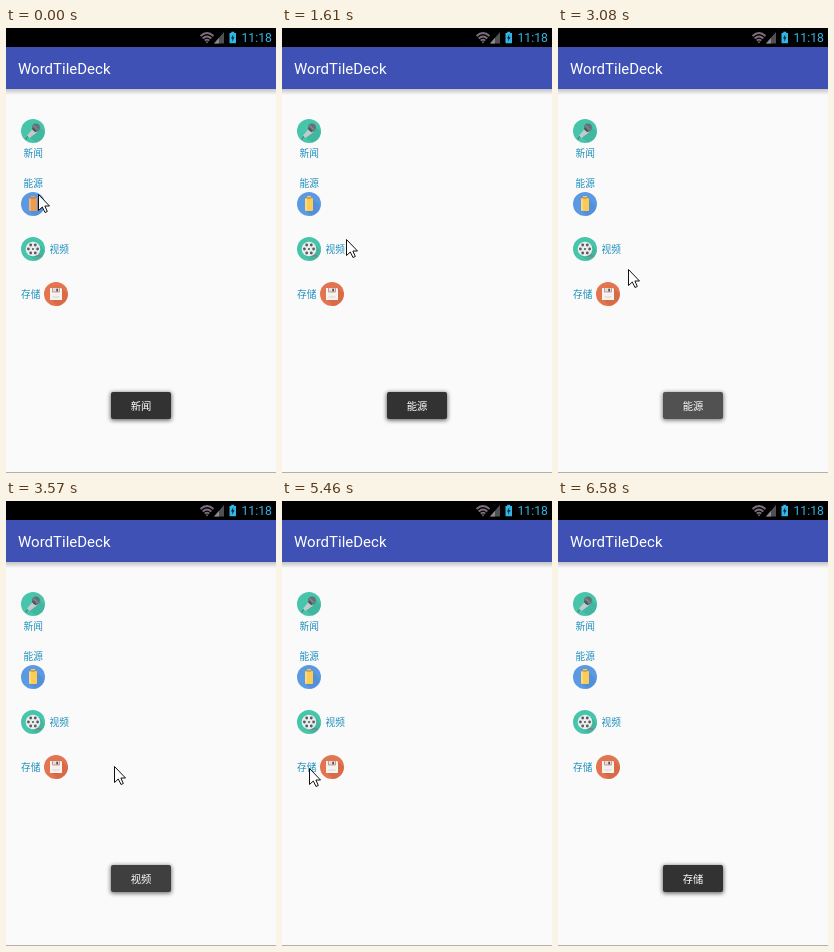
Write an HTML page that moves like this. It is 270 px wide and 445 px high and loops after 6930 ms.

```html
<!DOCTYPE html>
<html lang="zh">
<head>
<meta charset="utf-8">
<style>
  html, body { margin: 0; width: 100%; height: 100%; overflow: hidden; background: #fafafa; }
  svg { display: block; width: 270px; height: 445px; }
  text { font-family: Roboto, "Noto Sans CJK SC", "Noto Sans CJK", sans-serif; }
  .label { font-size: 9.7px; font-weight: 500; fill: #1e8fbd; }
</style>
</head>
<body>
<svg viewBox="0 0 270 445">
  <defs>
    <linearGradient id="drop" x2="0" y2="1">
      <stop stop-color="#000" stop-opacity=".22"/>
      <stop offset="1" stop-color="#000" stop-opacity="0"/>
    </linearGradient>
    <filter id="soft" x="-20%" y="-40%" width="140%" height="180%">
      <feGaussianBlur stdDeviation="2.2"/>
    </filter>
  </defs>
  <rect width="270" height="445" fill="#fafafa"/>
  <rect y="61" width="270" height="6" fill="url(#drop)"/>
  <rect y="19" width="270" height="42" fill="#3f51b5"/>
  <rect width="270" height="19"/>
  <rect y="444" width="270" height="1" fill="#b0b0b0"/>
  <text x="12" y="45.5" font-size="15" fill="#fff">WordTileDeck</text>

  <!-- status bar -->
  <path d="M194.500 8Q201 2 207.500 8M196.700 10.500Q201 6.300 205.300 10.500M198.800 12.700Q201 10.500 203.200 12.700"
    fill="none" stroke="#7e6d7c" stroke-width="1.900"/>
  <path d="M199.500 13.500h3L201 15.500z" fill="#7e6d7c"/>
  <path d="M218 4V15.500H208z" fill="#505055"/>
  <path d="M213 9.700V15.500H208z" fill="#8a8a8e"/>
  <path d="M223.500 5h1.700V3.700h3V5h1.800V15.300H223.500z" fill="#33b5e5"/>
  <path d="M227.300 6.300L225 10.500H226.500L225.900 13.800L228.600 9.300H227z" fill="#04242f"/>
  <text x="235.500" y="14" font-size="12.200" fill="#33b5e5">11:18</text>

  <!-- microphone -->
  <g transform="translate(27 103)">
    <circle r="12" fill="#47c5ab"/>
    <path d="M6-5L11.800 1A12 12 0 0 1 3 11.600L-4 6z" fill="#40b79e"/>
    <path d="M0-2.500L4 1.500L-3.500 7L-6 4.500z" fill="#c3cacb"/>
    <path d="M-5 5.500q-2 1-2 3" fill="none" stroke="#59636b"/>
    <circle cx="3" cy="-3.500" r="3.900" fill="#687078"/>
    <path d="M.5-5.500L5.500-1" stroke="#9ba2a7" stroke-width=".8"/>
    <path d="M-.5-2.800L2.800.8" stroke="#444c52" stroke-width="1.300"/>
  </g>
  <text class="label" x="17.500" y="129">新闻</text>

  <!-- battery -->
  <text class="label" x="17.500" y="159">能源</text>
  <g transform="translate(27 176)">
    <circle r="12" fill="#5b9ae2"/>
    <path d="M4-5L11 2A12 12 0 0 1 2 11.800L-3 7z" fill="#5490d9"/>
    <g id="cell">
      <rect x="-2" y="-8" width="4" height="3"/>
      <rect x="-4" y="-6" width="8" height="13" rx="1"/>
    </g>
    <path d="M-4-5v11.500h2v-11.500z" fill="#fff" opacity=".25"/>
    <path d="M-2-6h4" stroke="#8a6845" stroke-width=".8"/>
  </g>

  <!-- film reel -->
  <g transform="translate(27 221)">
    <circle r="12" fill="#47c5ab"/>
    <path d="M6-5L11.800 2A12 12 0 0 1 3 11.600L-5 6z" fill="#40b79e"/>
    <path d="M1 6H8V7.800H2z" fill="#7b8589"/>
    <circle r="7.300" fill="#ececec"/>
    <g id="holes" fill="#525c62"><circle r="1.100"/></g>
  </g>
  <text class="label" x="43.500" y="225">视频</text>

  <!-- floppy disk -->
  <text class="label" x="15" y="270">存储</text>
  <g transform="translate(50 266)">
    <circle r="12" fill="#e2744f"/>
    <path d="M6-6L11.800 0A12 12 0 0 1 1 12L-4 6z" fill="#d76b48"/>
    <path d="M-6-6H5L6-5V6H-6z" fill="#f5f2f0"/>
    <path d="M-3.500-6V-2H3.500V-6" fill="#e3dedb" stroke="#b98a78" stroke-width=".8"/>
    <rect x=".3" y="-5.300" width="1.700" height="2.700" fill="#4d4d52"/>
    <path d="M-3.500 3h7" stroke="#cbc5c1" stroke-width=".7"/>
  </g>

  <g id="toast">
    <rect x="104.500" y="364.500" width="61" height="28" rx="2" opacity=".6" filter="url(#soft)"/>
    <rect x="105" y="364" width="60" height="27" rx="2" fill="#323232"/>
    <text id="message" x="135" y="381.500" font-size="10.300" fill="#fff" text-anchor="middle"></text>
  </g>

  <g id="cursor">
    <circle id="press" cx="2" cy="2" r="18" fill="#888" fill-opacity=".15" stroke="#555"/>
    <path d="M.5.500V16.500L4.300 13L7 18.500L9.300 17.500L6.900 12H11.500z" fill="#fff" stroke="#111"/>
  </g>
</svg>
<script>
const LOOP = 6930, STEP = 70;
const $ = id => document.getElementById(id);
const clamp = v => Math.max(0, Math.min(1, v));

// time, x, y of the pointer tip
const path = [
  [0, 32, 166], [70, 32, 166], [280, 23, 171], [420, 23, 171], [560, 40, 189],
  [630, 61, 205], [700, 57, 207], [840, 57, 207], [1330, 71, 200], [1400, 71, 200],
  [2100, 49, 236], [2170, 47, 237], [2380, 25, 231], [2520, 24, 221], [2800, 24, 221],
  [3360, 116, 260], [3570, 108, 265], [4060, 54, 279], [4340, 27, 267], [5740, 27, 267],
  [5950, 223, 367], [6300, 229, 369], [6440, 233, 400], [6580, 201, 446], [LOOP, 201, 446]
];
const presses = [280, 2730, 5670];

// text, fade-in start and length, fade-out start and length
const toasts = [
  ["新闻", -500, 350, 870, 220],
  ["能源", 1060, 270, 2950, 330],
  ["视频", 3310, 350, 5010, 420],
  ["存储", 5810, 350, LOOP, 350]
];

for (let i = 0; i < 6; i++) {
  const hole = document.createElementNS("http://www.w3.org/2000/svg", "circle");
  hole.setAttribute("r", 1.4);
  hole.setAttribute("cx", 4.6 * Math.cos(i * Math.PI / 3));
  hole.setAttribute("cy", 4.6 * Math.sin(i * Math.PI / 3));
  $("holes").append(hole);
}

function pointer(t) {
  const i = path.findIndex(p => p[0] > t);
  const [t0, x0, y0] = path[i - 1], [t1, x1, y1] = path[i];
  const k = (t - t0) / (t1 - t0);
  return [Math.round(x0 + (x1 - x0) * k), Math.round(y0 + (y1 - y0) * k)];
}

function draw(now) {
  const t = Math.floor(now % LOOP / STEP) * STEP;
  $("cursor").setAttribute("transform", `translate(${pointer(t)})`);
  $("press").style.display = presses.some(p => t >= p && t < p + STEP) ? "" : "none";
  $("cell").setAttribute("fill", t < 210 ? "#f09a50" : "#fbcb54");

  const [text, start, rise, end, fall] = toasts.findLast(d => t >= d[1]);
  const fadeIn = 1 - (1 - clamp((t - start) / rise)) ** 2;
  const fadeOut = 1 - clamp((t - end) / fall) ** 2;
  $("message").textContent = text;
  $("toast").setAttribute("opacity", fadeIn * fadeOut);
}

const origin = performance.now();
function tick() {
  draw(performance.now() - origin);
  requestAnimationFrame(tick);
}
tick();
</script>
</body>
</html>
```
